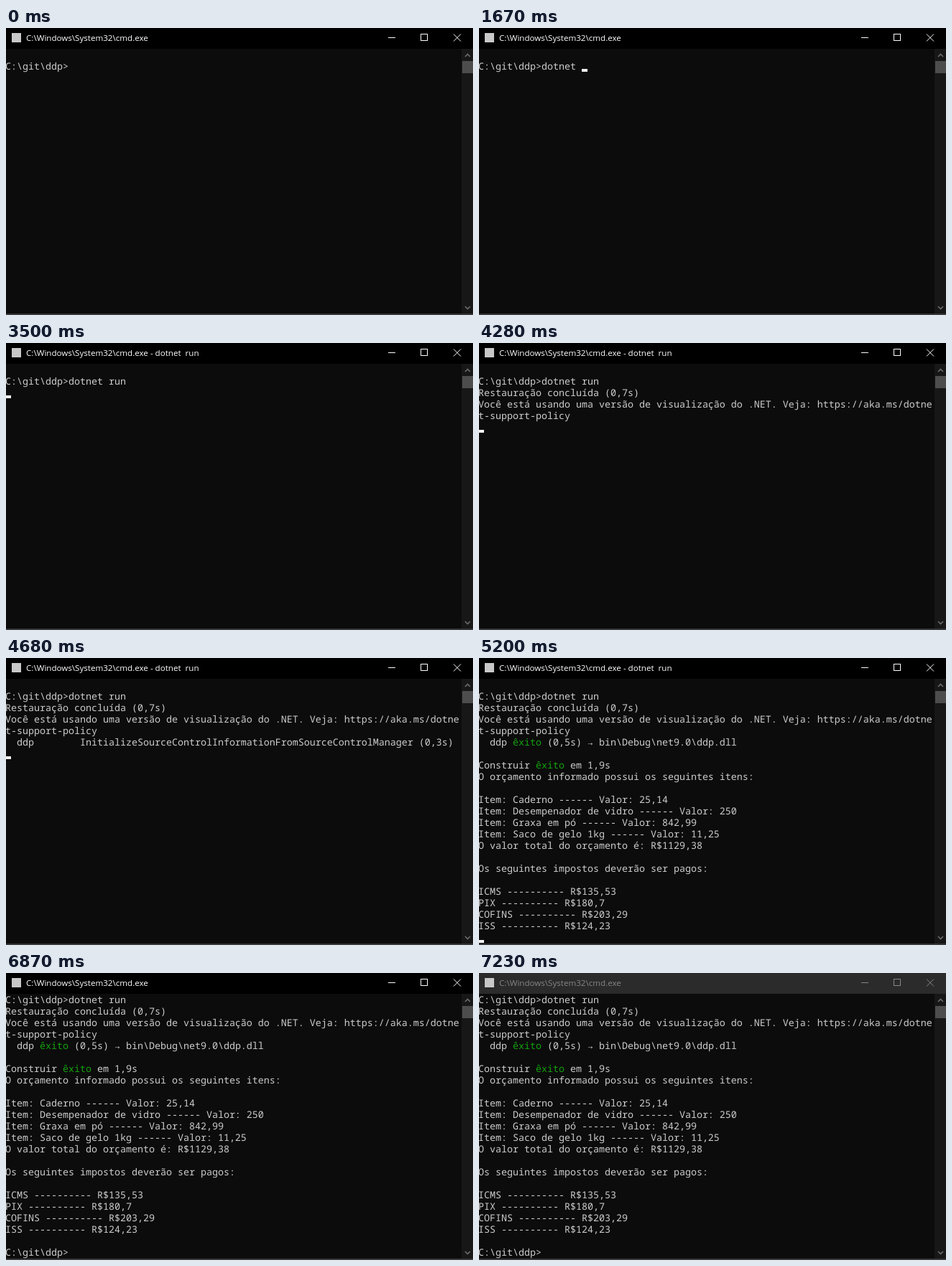
Recreate the animation shown at these times as an HTML page. Size 650 px wide and 400 px high, loop 7410 ms.

```html
<!DOCTYPE html>
<html lang="pt-BR">
<head>
<meta charset="utf-8">
<title>Console</title>
<style>
  html, body { margin: 0; width: 100%; height: 100%; overflow: hidden; background: #383838; }
  #win { position: absolute; left: 0; top: 0; width: 650px; height: 400px; overflow: hidden; background: #383838; }
  #bar { position: absolute; left: 0; top: 0; width: 650px; height: 29px; background: #000; color: #fff; }
  #title {
    position: absolute; left: 28px; top: 0; white-space: pre;
    font: 11.6px/27px "Open Sans", "Noto Sans", sans-serif;
  }
  #bar svg, #scroll svg { position: absolute; left: 0; top: 0; fill: none; }
  #bar svg { stroke: currentColor; }
  #bar.idle { background: #2b2b2b; color: #868686; }
  #icon { position: absolute; left: 8px; top: 7px; width: 13px; height: 13px; background: #c8c8c8; }
  #con { position: absolute; left: 0; top: 29px; width: 634px; height: 369px; background: #0c0c0c; overflow: hidden; }
  #text {
    position: absolute; left: -1px; top: 0; color: #ccc; white-space: pre;
    font: 13.3333px/16px "Noto Sans Mono", "DejaVu Sans Mono", monospace;
    font-variant-ligatures: none; text-rendering: geometricPrecision;
  }
  #text div { height: 16px; }
  #text b { font-weight: inherit; color: #13a10e; }
  #cursor { position: absolute; width: 8px; height: 4px; background: #f2f2f2; }
  #scroll { position: absolute; left: 634px; top: 29px; width: 16px; height: 369px; background: #171717; }
  #thumb { position: absolute; left: 1px; top: 17px; width: 15px; height: 17px; background: #4d4d4d; }
</style>
</head>
<body>
<div id="win">
  <div id="bar">
    <div id="icon"></div>
    <div id="title"></div>
    <svg width="650" height="29">
      <path d="M532 13.5h10M577.5 8.5h9v9h-9z" shape-rendering="crispEdges"/>
      <path d="M623 8.5l10 10M633 8.5l-10 10"/>
    </svg>
  </div>
  <div id="con"><div id="text"></div><div id="cursor"></div></div>
  <div id="scroll">
    <div id="thumb"></div>
    <svg width="16" height="369" stroke="#6b6b6b" stroke-width="1.6">
      <path d="M5 11l3.5-3.5L12 11M5 359l3.5 3.5L12 359"/>
    </svg>
  </div>
</div>
<script>
const LOOP = 7410;
const PROMPT = 'C:\\git\\ddp>';
const CMD = 'dotnet run';
const SHELL = 'C:\\Windows\\System32\\cmd.exe';
const KEYS = [620, 740, 990, 1370, 1470, 1570, 1670, 1850, 1950, 2350];
const TARGET = 'InitializeSourceControlInformationFromSourceControlManager';

const POLICY = [
  'Você está usando uma versão de visualização do .NET. Veja: https://aka.ms/dotne',
  't-support-policy'
];
const REPORT = `O orçamento informado possui os seguintes itens:

Item: Caderno ------ Valor: 25,14
Item: Desempenador de vidro ------ Valor: 250
Item: Graxa em pó ------ Valor: 842,99
Item: Saco de gelo 1kg ------ Valor: 11,25
O valor total do orçamento é: R$1129,38

Os seguintes impostos deverão ser pagos:

ICMS ---------- R$135,53
PIX ---------- R$180,7
COFINS ---------- R$203,29
ISS ---------- R$124,23`.split('\n');

const $ = id => document.getElementById(id);
const bar = $('bar'), title = $('title'), text = $('text'), cursor = $('cursor');

// Live build status: project on the left, target and seconds flush with column 78
const status = (target, ms) =>
  '  ddp' + `${target} (0,${Math.floor(ms / 100)}s)`.padStart(73);

function outputLines(t) {
  if (t < 3110 || (t >= 3500 && t < 3620)) return [];
  if (t < 3880) return [status('Restore', t - 3110)];
  const out = ['Restauração concluída (0,7s)'];
  if (t >= 4080) out.push(...POLICY);
  if (t >= 4820) out.push('  ddp <b>êxito</b> (0,5s) → bin\\Debug\\net9.0\\ddp.dll');
  else if (t >= 4320) out.push(status(TARGET, t - 4350 < 0 ? 0 : t - 4350));
  if (t >= 4870) out.push('', 'Construir <b>êxito</b> em 1,9s');
  if (t >= 5200) out.push(...REPORT);
  return out;
}

function cursorOn(t) {
  if (t < 490) return false;
  if (t >= 2050 && t < 2350) return false;
  return t < 5810 || (t >= 6370 && t < 6870);
}

function stateAt(t) {
  const done = t >= 5250;
  const typed = CMD.slice(0, KEYS.filter(k => t >= k).length);
  const rows = ['', PROMPT + typed];
  let row = 1, col = rows[1].length;
  if (t >= 2530) {
    rows.push(...outputLines(t));
    row = rows.length;
    col = 0;
  }
  if (done) {
    rows.push('', PROMPT);
    rows.shift();
    row = rows.length - 1;
    col = PROMPT.length;
  }
  return {
    rows, row, col,
    title: SHELL + (t >= 2600 && !done ? ' - dotnet  run' : ''),
    idle: t >= 7230
  };
}

let shown = '';
function draw(t) {
  const s = stateAt(t), on = cursorOn(t);
  const key = JSON.stringify([s, on]);
  if (key === shown) return;
  shown = key;
  title.textContent = s.title;
  bar.className = s.idle ? 'idle' : '';
  text.innerHTML = s.rows.map(r => `<div>${r.replace(/>$|>(?=d)/, '&gt;')}</div>`).join('');
  cursor.style.left = s.col * 8 - 1 + 'px';
  cursor.style.top = s.row * 16 + 12 + 'px';
  cursor.style.visibility = on ? 'visible' : 'hidden';
}

const start = performance.now();
function tick() {
  draw((performance.now() - start) % LOOP);
  requestAnimationFrame(tick);
}
tick();
</script>
</body>
</html>
```
